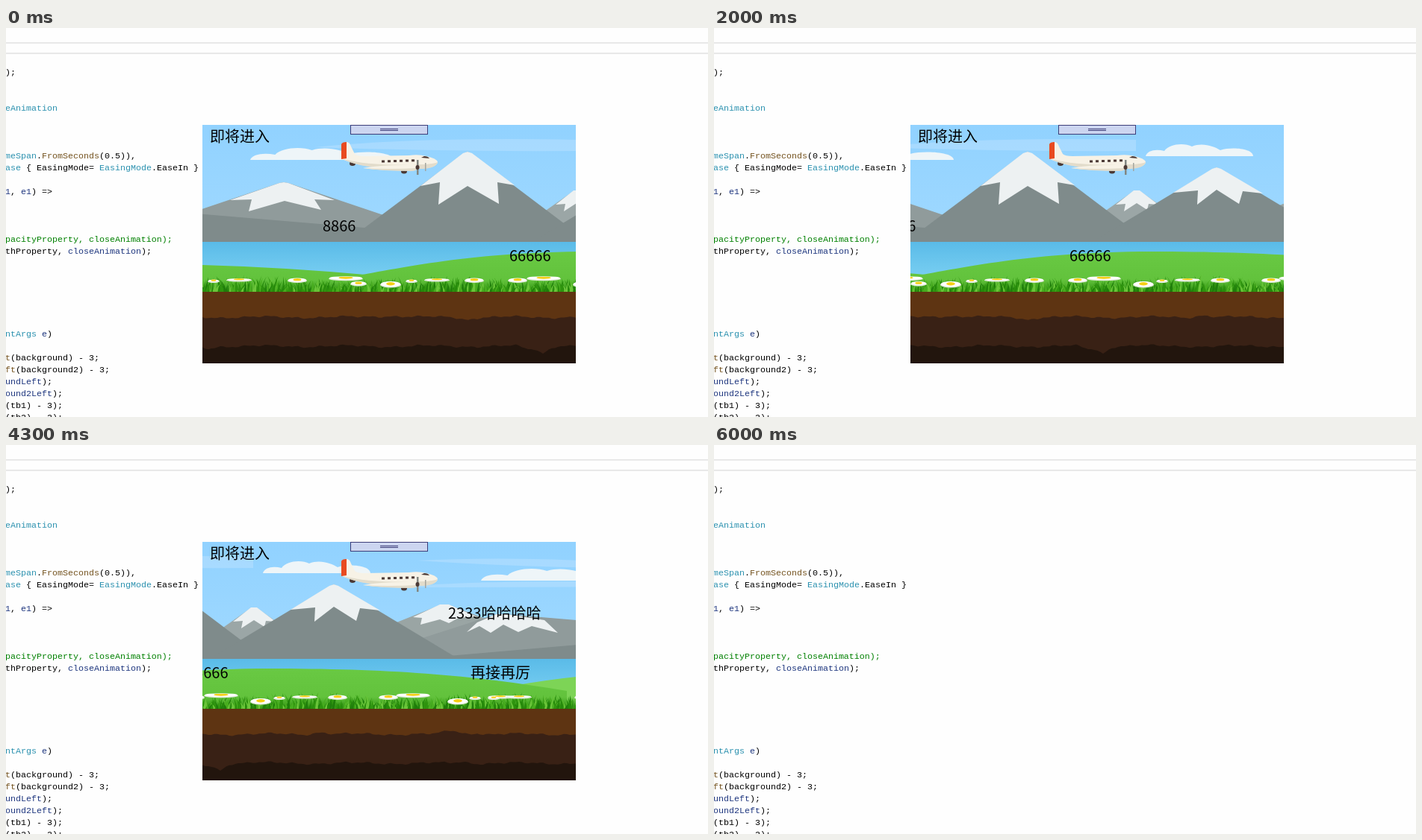
An HTML page with a canvas for the animation above (6300 ms loop, 940x522 px).

```html
<!DOCTYPE html>
<html lang="zh">
<head>
<meta charset="utf-8">
<style>
  html, body { margin: 0; width: 100%; height: 100%; overflow: hidden; background: #fefefe; }
  canvas { display: block; }
</style>
</head>
<body>
<canvas id="stage" width="940" height="522"></canvas>
<script>
const LOOP = 6300, LEFT = 263, TOP = 130, WIDTH = 500, HEIGHT = 320, TILE = 1100;
const stage = document.getElementById('stage').getContext('2d');

const INK = { k: '#000', t: '#2b91af', m: '#74531f', v: '#1f377f', g: '#008000' };
// Each line: centre y, then pairs of colour key and text.
const CODE = [
  [59, 'k', ');'],
  [107, 't', 'eAnimation'],
  [171, 't', 'meSpan', 'k', '.', 'm', 'FromSeconds', 'k', '(0.5)),'],
  [187, 't', 'ase', 'k', ' { EasingMode= ', 't', 'EasingMode', 'k', '.EaseIn }'],
  [219, 'v', '1', 'k', ', ', 'v', 'e1', 'k', ') =>'],
  [283, 'g', 'pacityProperty, closeAnimation);'],
  [299, 'k', 'thProperty, ', 'v', 'closeAnimation', 'k', ');'],
  [410, 't', 'ntArgs ', 'v', 'e', 'k', ')'],
  [442, 'm', 't', 'k', '(background) - 3;'],
  [458, 'm', 'ft', 'k', '(background2) - 3;'],
  [474, 'v', 'undLeft', 'k', ');'],
  [490, 'v', 'ound2Left', 'k', ');'],
  [506, 'k', '(tb1) - 3);'],
  [522, 'k', '(tb2) - 3);']
];

const COMMENTS = [['8866', 424, 273], ['66666', 674, 313], ['2333哈哈哈哈', 1024, 233], ['再接再厉', 1054, 313]];

let seed = 7;
function random() {
  seed = (seed * 16807) % 2147483647;
  return seed / 2147483647;
}

function poly(c, color, points) {
  const n = points.trim().split(/[ ,]+/).map(Number);
  c.fillStyle = color;
  c.beginPath();
  for (let i = 0; i < n.length; i += 2) c.lineTo(n[i], n[i + 1]);
  c.fill();
}

function shape(c, color, path) {
  c.fillStyle = color;
  c.fill(new Path2D(path));
}

function rect(c, color, x, y, w, h) {
  c.fillStyle = color;
  c.fillRect(x, y, w, h);
}

function oval(c, color, x, y, rx, ry) {
  c.fillStyle = color;
  c.beginPath();
  c.ellipse(x, y, rx, ry, 0, 0, 7);
  c.fill();
}

function fade(c, y0, y1, from, to) {
  const g = c.createLinearGradient(0, y0, 0, y1);
  g.addColorStop(0, from);
  g.addColorStop(1, to);
  return g;
}

function cloud(c, x, y, w) {
  c.save();
  c.translate(x, y);
  c.scale(w / 144, 1);
  shape(c, '#eef5f8', 'M0 0C2-8 14-10 25-7C32-17 52-18 62-13C76-19 92-13 100-8C116-13 144-10 144 0Z');
  c.restore();
}

function ground(c, color, base, bumps) {
  c.fillStyle = color;
  c.beginPath();
  c.moveTo(0, 450);
  for (let x = 0; x <= TILE; x += 4) {
    let y = base + Math.sin(x * .057) * 1.2 + Math.sin(x * .19) * .8 + Math.sin(x * .43) * .6;
    for (const [at, height, spread] of bumps) y += height * Math.max(0, 1 - Math.abs(x - at) / spread);
    c.lineTo(x, y);
  }
  c.lineTo(TILE, 450);
  c.fill();
}

function daisy(c, x, y, rx, ry) {
  oval(c, '#dfe9d8', x, y + 1, rx, ry);
  oval(c, '#fff', x, y, rx - 1, ry - .5);
  oval(c, '#f5cf16', x, y - .3, rx * .42, ry * .55);
}

function mountains(c) {
  const snow = '#edf1f2', dark = '#7f8b8b';
  poly(c, '#909b9b', '-132,287 103,208 109,207 115,208 260,257 260,287');
  poly(c, dark, '-10,249 217,268 250,287 -10,287');
  poly(c, snow, '37,231 103,208 109,207 115,208 177,231 150,230 159,244 110,232 62,246 66,230');
  poly(c, '#9ba6a6', '400,287 498,218 504,218 602,287');
  poly(c, snow, '473,237 497,218 505,218 530,237 517,236 515,244 501,235 484,246 486,236');
  poly(c, '#9aa5a4', '570,287 752,214 760,214 910,270 910,287');
  poly(c, snow, '714,231 750,214 762,214 798,230 775,232 762,239 750,234 724,241 726,232');
  poly(c, '#909b9b', '640,287 826,227 838,227 1004,241 1100,250 1100,287');
  poly(c, dark, '740,287 762,283 1004,262 1100,256 1100,287');
  poly(c, snow, '786,251 800,238 826,227 838,227 890,235 908,252 873,243 855,251 835,241 818,252 803,243');
  poly(c, dark, '192,287 349,169 355,166 361,169 517,287');
  poly(c, snow, '292,212 349,168 355,166 361,168 418,211 395,207 397,236 355,212 316,237 318,207');
  poly(c, dark, '441,287 602,190 608,187 614,190 775,287');
  poly(c, snow, '550,221 602,189 608,187 614,189 670,222 643,219 638,236 608,217 582,237 583,218');
}

function grass(c) {
  rect(c, fade(c, 338, 354, 'rgba(58,158,25,0)', '#228009'), 0, 338, TILE, 16);
  const greens = ['#1f7d0b', '#2f940f', '#48ad1f', '#6bc53a', '#268a0b'];
  for (let i = 0; i < 1050; i++) {
    const x = random() * TILE, lean = random() * 14 - 7, w = 1 + random() * 1.5;
    const h = 6 + random() * (14 + 3 * Math.sin(x / 41));
    shape(c, greens[i % 5], `M${x - w} 354Q${x} ${354 - h / 2} ${x + lean} ${354 - h}Q${x + w} ${354 - h / 2} ${x + w} 354Z`);
  }
  for (const x of [37, 302, 557, 819, 844]) {
    daisy(c, x + 12, 337.5, 17, 2);
    daisy(c, x - 22, 339, 8, 2);
  }
  for (const x of [127, 364, 422, 613, 681, 943]) daisy(c, x, 338, 13, 3);
  for (const x of [192, 457, 714, 982]) daisy(c, x, 335.5, 23, 2.8);
  daisy(c, 209, 342.5, 11, 3);
  for (const x of [252, 510, 774]) daisy(c, x, 343.5, 14, 4);
}

function makeTile() {
  const canvas = document.createElement('canvas');
  canvas.width = TILE;
  canvas.height = 522;
  const c = canvas.getContext('2d');
  rect(c, fade(c, 130, 287, '#91d2ff', '#a0d9ff'), 0, 130, TILE, 157);
  const wisp = 'rgba(190,226,255,.45)';
  shape(c, wisp, 'M150 160Q290 146 500 150L500 165Q320 166 150 160Z');
  shape(c, wisp, 'M704 191Q760 182 1004 183L1004 190Q840 191 704 191Z');
  shape(c, wisp, 'M720 155Q860 148 1030 160L1030 166Q850 164 720 155Z');
  cloud(c, 64, 177, 192);
  cloud(c, 513, 172, 144);
  cloud(c, 805, 182, 205);
  mountains(c);
  rect(c, fade(c, 287, 335, '#5abbe8', '#79cff2'), 0, 287, TILE, 67);
  const leaf = fade(c, 300, 340, '#69c943', '#62c23c');
  shape(c, leaf, 'M0 318Q110 321 230 332V354H0Z');
  shape(c, '#7dd456', 'M820 328Q920 309 1010 305Q1065 308 1100 318V354H820Z');
  shape(c, leaf, 'M190 335C250 326 350 300 520 300C680 300 790 308 920 330V354H190Z');
  grass(c);
  rect(c, '#5e3412', 0, 354, TILE, 96);
  ground(c, '#392115', 388, [[355, 3, 18], [590, -3, 20], [766, -5, 22], [800, -2, 16], [250, -2, 40]]);
  ground(c, '#22150d', 427, [[455, 10, 14], [436, 4, 16], [8, 3, 14], [500, -1, 30], [780, -2, 20]]);
  return canvas;
}

function drawPlane(c) {
  const cream = '#f7f2e6', shade = '#e2dccb', dark = '#4b3935', metal = '#828681';
  oval(c, dark, 464, 182, 4, 3);
  shape(c, cream, 'M455 153Q460 152 462 159L467 169Q470 172 480 172L540 171Q552 169 563 172Q577 175 578 180Q576 187 560 188L500 188Q466 183 450 176Z');
  shape(c, '#e84a20', 'M449 176V156Q450 153 456 153V175Z');
  shape(c, shade, 'M452 176Q490 186 560 183Q574 182 578 180Q576 188 558 189L500 188Q465 184 452 176Z');
  for (let x = 503; x < 548; x += 8) rect(c, dark, x, 177.5 - (x - 503) * .03, 4, 3);
  shape(c, dark, 'M556 174L560 172Q565 172 567 175Z');
  oval(c, dark, 533, 192.5, 4, 3);
  shape(c, cream, 'M478 188Q500 184 532 184Q545 181 552 185Q553 190 546 191Q510 192 478 188Z');
  shape(c, shade, 'M478 188Q510 190 551 188Q550 192 543 192Q505 192 478 188Z');
  rect(c, metal, 550, 177, 2.5, 20);
  oval(c, dark, 551, 187, 2.5, 3);
  rect(c, '#a3a59f', 561, 181, 1.5, 11);
}

function drawPage(c) {
  rect(c, '#fefefe', 0, 0, 940, 522);
  rect(c, '#e8e8e8', 0, 19, 940, 2);
  rect(c, '#e8e8e8', 0, 33, 940, 2);
  c.font = '11.667px "Liberation Mono", monospace';
  for (const [y, ...parts] of CODE) {
    let x = -1;
    for (let i = 0; i < parts.length; i += 2) {
      c.fillStyle = INK[parts[i]];
      c.fillText(parts[i + 1], x, y + 4);
      x += parts[i + 1].length * 7;
    }
  }
}

function drawWindow(c, scroll, width) {
  c.save();
  c.beginPath();
  c.rect(LEFT, TOP, width, HEIGHT);
  c.clip();
  c.drawImage(tile, LEFT - scroll, 0);
  c.drawImage(tile, LEFT - scroll + TILE, 0);

  c.save();
  c.translate(Math.round((width - WIDTH) / 2), 0);
  drawPlane(c);
  rect(c, '#3d3d78', 461, 130, 104, 13);
  rect(c, '#ccd5f0', 462, 131, 102, 11);
  rect(c, '#3d3d78', 501, 135, 24, 1);
  rect(c, '#3d3d78', 501, 137, 24, 1);
  c.restore();

  c.fillStyle = '#000';
  c.font = '20px "Noto Sans CJK SC", "Noto Sans CJK", sans-serif';
  c.fillText('即将进入', 273, 153);
  for (const [text, x, y] of COMMENTS) c.fillText(text, x - scroll, y);
  c.restore();
}

// Back ease-in: the window first widens, then collapses to nothing.
function windowWidth(t) {
  const p = Math.min(1, Math.max(0, (t - 5450) / 500));
  return WIDTH * (1 - (p ** 3 - p * Math.sin(Math.PI * p)));
}

const tile = makeTile();

function frame(now) {
  const t = Math.floor(now % LOOP / 100) * 100;
  const scroll = 6 * Math.floor(Math.min(t, 5200) * .0168 + .3);
  drawPage(stage);
  if (t < 6000) drawWindow(stage, scroll, windowWidth(t));
  requestAnimationFrame(frame);
}
frame(performance.now());
</script>
</body>
</html>
```
